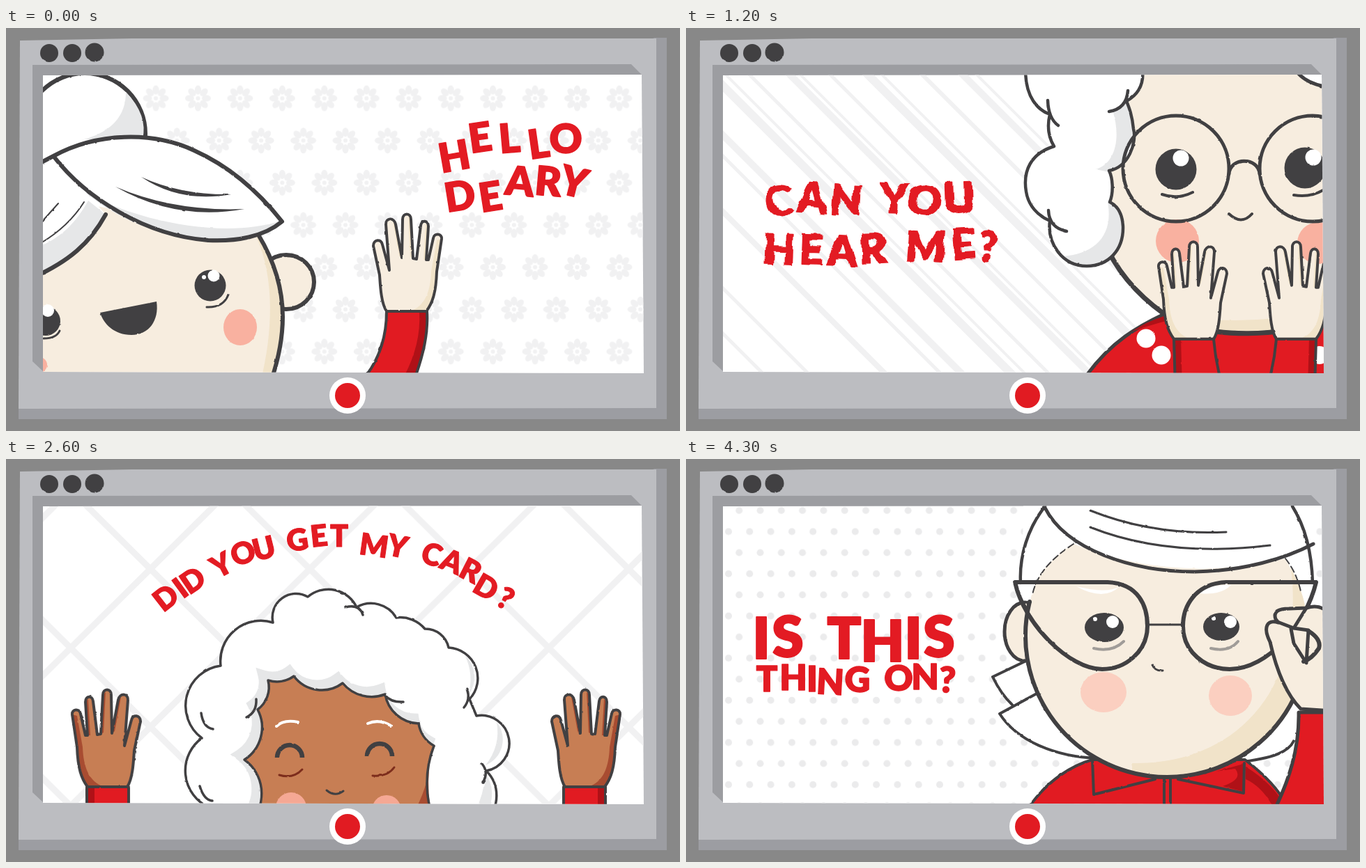
Recreate the animation shown at these times as an HTML page. Size 967 by 579 pixels, loop 4.4 s.

```html
<!DOCTYPE html>
<html lang="en">
<head>
<meta charset="utf-8">
<title>Video call</title>
<style>
  html, body { margin: 0; width: 100%; height: 100%; overflow: hidden; background: #888; }
  svg { display: block; width: 967px; height: 579px; --skin: #f7eddf; --shade: #f1e3c9; }
  .ink { stroke: #414042; stroke-linecap: round; stroke-linejoin: round; }
  .line { fill: none; }
  .dark { fill: #414042; }
  .white { fill: #fff; }
  .skin { fill: var(--skin); }
  .shade { fill: var(--shade); }
  .red { fill: #e11b22; }
  .deep { fill: #b01117; }
  .grey { fill: #e6e7e8; }
  .blush { fill: #f9b1a0; }
  .brown { --skin: #c77e54; --shade: #a84c31; }
  text { font-family: Lato, "Open Sans", sans-serif; font-weight: 900; text-anchor: middle;
         fill: #e31b23; stroke: #e31b23; stroke-linejoin: round; }
</style>
</head>
<body>
<svg viewBox="0 0 967 579">
  <defs>
    <clipPath id="screen"><path d="M53 68L912 67L915 496L53 494Z"/></clipPath>
    <filter id="ink" x="-5%" y="-5%" width="110%" height="110%" color-interpolation-filters="sRGB">
      <feTurbulence type="fractalNoise" baseFrequency=".12" numOctaves="2" seed="4"/>
      <feDisplacementMap in="SourceGraphic" scale="2" xChannelSelector="R" yChannelSelector="G"/>
    </filter>
    <filter id="rough" color-interpolation-filters="sRGB">
      <feTurbulence type="fractalNoise" baseFrequency=".06" numOctaves="1" seed="8"/>
      <feDisplacementMap in="SourceGraphic" scale="9" xChannelSelector="R" yChannelSelector="G"/>
    </filter>

    <g id="flower" fill="#f1f1f2"></g>
    <pattern id="flowers" x="184.8" y="70.7" width="60.45" height="121.3" patternUnits="userSpaceOnUse">
      <use href="#flower" x="30.2" y="30.3"/>
      <use href="#flower" y="91"/><use href="#flower" x="60.45" y="91"/>
    </pattern>
    <pattern id="lattice" x="207" y="158" width="228.7" height="227" patternUnits="userSpaceOnUse">
      <path d="M-20 -20L249 247M-20 247L249 -20" stroke="#f1f1f2" stroke-width="9"/>
    </pattern>
    <pattern id="dots" x="61" y="58.8" width="30.3" height="60.6" patternUnits="userSpaceOnUse">
      <g fill="#ebebec"><circle cx="15.2" cy="15.2" r="5"/><circle cy="45.4" r="5"/><circle cx="30.3" cy="45.4" r="5"/></g>
    </pattern>

    <!-- Open hand, origin at the tip of the middle finger -->
    <g id="hand">
      <path id="palm" class="skin" d="M-29 140C-37 128 -38 103 -39 88L-48 46C-48 37 -37 35 -35 44L-25 81L-30 15C-30 5 -18 5 -16 15L-7 63L-6 8C-6 -2 6 -2 6 8L9 64L14 65L20 17C21 8 31 9 31 18L28 66L31 66L38 35C39 27 51 28 50 36L43 83C42 113 37 128 28 140Z"/>
      <path class="shade" d="M50 36L43 83C42 113 37 128 28 140L4 140C27 133 34 110 35 83L43 38ZM31 18L28 66L24 66L27 14ZM6 8L9 64L5 62L2 4ZM-16 15L-7 63L-11 60L-20 11Z"/>
      <use href="#palm" class="ink line" fill-opacity="0" stroke-width="4"/>
    </g>
    <g id="cuffedHand">
      <rect class="red" x="-31" y="140" width="60" height="60"/>
      <rect class="deep" x="18" y="140" width="11" height="60"/>
      <path class="ink line" stroke-width="4" d="M-31 200V140H29V200"/>
      <use href="#hand"/>
    </g>
  </defs>

  <!-- Monitor -->
  <path fill="#9c9da2" d="M930 14H948V562H18V544Z"/>
  <path fill="#bcbdc1" d="M20 18L180 15L933 15V546L18 547Z"/>
  <path fill="#9c9da1" d="M38 53L897 52L912 67L54 70V494L38 479Z"/>
  <path class="white" d="M53 68L912 67L915 496L53 494Z"/>
  <g class="dark" filter="url(#ink)"><circle cx="62" cy="36" r="13"/><circle cx="95" cy="36" r="13"/><circle cx="127" cy="35" r="13.5"/></g>
  <circle class="white" cx="490" cy="528" r="26"/>
  <circle class="red" cx="490" cy="528" r="18"/>

  <g clip-path="url(#screen)">
    <!-- Waving -->
    <g class="scene">
      <rect x="53" y="67" width="862" height="429" fill="url(#flowers)"/>
      <g filter="url(#ink)">
        <ellipse class="skin ink" cx="402" cy="365" rx="40" ry="39" stroke-width="6"/>
        <path class="skin" d="M40 240L362 297C385 335 397 375 397 415C397 445 391 475 381 505H40Z"/>
        <path class="shade" d="M358 297C385 335 397 375 397 415C397 445 391 475 381 505H366C382 440 387 360 358 297Z"/>
        <path class="ink line" stroke-width="6" d="M362 297C385 335 397 375 397 415C397 445 391 475 381 505"/>
        <circle class="white ink" cx="113" cy="152" r="87" stroke-width="6"/>
        <path class="grey" d="M172 92Q204 125 196 160H112Q172 143 172 92Z"/>
        <path class="white" d="M40 197L68 181L143 268C120 310 90 335 40 355Z"/>
        <path class="grey" d="M118 248C100 280 80 300 50 313V350C90 334 120 308 143 268Z"/>
        <path class="ink line" stroke-width="6" d="M143 268C120 310 90 335 40 358"/>
        <path class="ink line" stroke-width="2" d="M75 252L50 280M112 250Q90 285 50 309"/>
        <path class="white" d="M68 184C130 150 210 148 270 176C330 203 370 245 396 278C370 300 330 307 290 305C200 298 115 245 68 184Z"/>
        <path class="grey" d="M112 235C180 275 310 305 394 277C370 300 330 307 290 305C220 300 160 275 112 235Z"/>
        <path class="ink line" stroke-width="6" d="M45 196L68 184C130 150 210 148 270 176C330 203 370 245 396 278C370 300 330 307 290 305C200 298 115 245 68 184"/>
        <path class="dark" d="M194 214Q250 240 323 239Q250 252 194 214ZM157 228Q240 264 342 260Q245 278 157 228Z"/>
        <g class="dark">
          <circle cx="293" cy="370" r="22.5"/><circle cx="57" cy="421" r="21"/>
          <path d="M135 409L216 393C220 420 205 441 180 441C155 441 140 425 135 409Z"/>
        </g>
        <g class="white"><circle cx="298" cy="356" r="8.5"/><circle cx="284" cy="358" r="3"/><circle cx="60" cy="406" r="9"/></g>
        <path class="ink line" stroke-width="3" d="M288 401Q312 402 319 383M54 446Q72 446 77 435"/>
        <ellipse class="blush" cx="336" cy="430" rx="24" ry="26"/>
        <circle class="blush" cx="48" cy="484" r="11"/>
        <g id="wave">
          <path class="red" d="M-29 140H29C31 173 23 203 13 232H-58C-40 208 -29 178 -29 140Z"/>
          <path class="deep" d="M18 140H29C31 173 23 203 13 232H-3C12 203 20 173 18 140Z"/>
          <path class="ink line" stroke-width="4" d="M-58 232C-40 208 -29 178 -29 140H29C31 173 23 203 13 232"/>
          <use href="#hand"/>
        </g>
      </g>
      <g class="words" data-size="58"></g>
    </g>

    <!-- Hands on cheeks -->
    <g class="scene">
      <g id="stripes" stroke="#f1f1f2"></g>
      <g filter="url(#ink)">
        <path class="skin" d="M600 60H920V420C860 450 760 450 700 420C660 395 625 360 605 318Z"/>
        <path class="shade" d="M690 410Q795 432 920 405V425C860 448 760 448 700 420Z"/>
        <path class="red ink" stroke-width="5" d="M574 500C610 450 650 428 686 411Q795 468 925 411V505Z"/>
        <path class="ink line" stroke-width="7" d="M605 318C625 360 660 395 700 420C760 446 850 444 920 420"/>
        <path class="deep" d="M640 436Q660 422 686 414L692 420Q662 428 640 436Z"/>
        <g class="white"><circle cx="660" cy="446" r="13.5"/><circle cx="682" cy="470" r="13.5"/><circle cx="909" cy="470" r="13"/></g>
        <g class="blush"><circle cx="705" cy="306" r="31"/><circle cx="907" cy="309" r="30"/></g>
        <path id="curls" class="white" d="M487 60C487 100 505 118 522 124C517 145 522 160 528 170C495 180 483 205 488 235C491 255 505 270 522 277C518 310 540 342 575 342C605 342 628 320 627 285C626 265 618 255 608 250C614 235 612 215 607 205C635 200 647 165 642 145C640 125 636 115 632 105C650 95 657 80 655 60Z"/>
        <path class="grey" d="M612 118C625 160 615 195 588 203L607 207C645 190 645 140 632 108ZM605 250C614 300 585 325 540 328C565 348 625 345 627 290C626 265 618 255 605 250Z"/>
        <use href="#curls" class="ink line" fill-opacity="0" stroke-width="4.5"/>
        <path class="ink line" stroke-width="4.5" d="M519 104Q520 130 534 140M520 262Q521 287 546 292M634 90Q632 116 607 120"/>
        <path class="white ink" stroke-width="5" d="M874 60Q890 82 925 85V60Z"/>
        <g class="ink line" stroke-width="5">
          <circle cx="703" cy="202" r="76"/><circle cx="899" cy="202" r="76"/>
          <path d="M779 210C780 185 822 185 823 210"/>
        </g>
        <g class="dark"><circle cx="703" cy="203" r="29.5"/><circle cx="888" cy="201" r="29.5"/></g>
        <g class="white"><circle cx="710" cy="187" r="11.5"/><circle cx="900" cy="186" r="11.5"/></g>
        <path class="ink line" stroke-width="4" d="M683 239Q705 247 727 236M872 240Q895 244 914 233M779 267Q797 284 812 267"/>
        <g id="cheekHands">
          <g id="sleeved" transform="translate(876 302)">
            <path class="red" d="M-29 140H28L26 210H-42Z"/>
            <path class="deep" d="M18 140H28L26 210H16Z"/>
            <path class="ink line" stroke-width="4" d="M-42 210Q-32 175 -29 140H28L26 210"/>
            <use href="#hand"/>
          </g>
          <use href="#sleeved" transform="matrix(-1 0 0 1 1604 0)"/>
        </g>
      </g>
      <g class="words" data-size="60"></g>
    </g>

    <!-- Peeking up -->
    <g class="scene">
      <rect x="53" y="67" width="862" height="429" fill="url(#lattice)"/>
      <g class="words" data-size="43"></g>
      <g class="brown" filter="url(#ink)">
        <g id="peek">
          <path class="white ink" stroke-width="3.5" d="M290 500A58 58 0 0 1 281 401A58 58 0 0 1 308 297A58 58 0 0 1 383 235A34 34 0 0 1 433 198A45 45 0 0 1 503 213A42 42 0 0 1 560 228A46 46 0 0 1 601 244A34 34 0 0 1 635 271A44 44 0 0 1 665 345L675 369A40 40 0 0 1 689 448A50 50 0 0 1 688 520H290Z"/>
          <path class="grey" d="M658 281A44 44 0 0 1 663 340Q672 310 658 281ZM704 378A40 40 0 0 1 688 440Q710 412 704 378ZM688 452A50 50 0 0 1 688 510H672Q686 480 688 452Z"/>
          <use href="#face" x="-7" y="-7" style="--skin:#e6e7e8" stroke="#e6e7e8" stroke-width="15"/>
          <path id="face" class="skin" d="M352 520A60 60 0 0 0 342 432A55 55 0 0 0 361 360A40 40 0 0 0 376 318A42 42 0 0 0 413 312A50 50 0 0 0 483 322A54 54 0 0 0 544 338A50 50 0 0 0 592 380A44 44 0 0 0 614 412A150 150 0 0 0 614 520Z"/>
          <path class="shade" d="M607 445Q604 480 611 520H578Q602 482 607 445Z"/>
          <use href="#face" class="ink line" fill-opacity="0" stroke-width="3.5"/>
          <path class="ink line" stroke-width="3.5" d="M487 213Q507 208 512 224M280 365Q283 386 297 388M359 345Q360 364 345 371M661 330Q667 345 657 357M683 438Q693 450 684 465M544 340Q553 350 570 349M278 470Q284 490 296 491"/>
          <path class="line" stroke="#fff" stroke-width="4" stroke-linecap="round" d="M388 384Q398 374 419 378M519 380Q535 373 552 383"/>
          <path class="ink line" style="stroke-linecap:butt" stroke-width="6.5" d="M389 429A18 18 0 0 1 425 429M518 427A18 18 0 0 1 554 427"/>
          <path class="line" stroke="#7d2d1c" stroke-width="3" stroke-linecap="round" d="M392 454Q412 460 425 446M526 455Q547 457 557 443"/>
          <path class="ink line" stroke-width="3" d="M460 476Q472 486 484 477"/>
          <g fill="#f5a894"><circle cx="409" cy="501" r="22"/><circle cx="546" cy="504" r="21"/></g>
        </g>
        <use id="leftHand" href="#cuffedHand"/>
        <use id="rightHand" href="#cuffedHand"/>
      </g>
    </g>

    <!-- Adjusting glasses -->
    <g class="scene">
      <rect x="53" y="67" width="862" height="429" fill="url(#dots)"/>
      <g filter="url(#ink)">
        <path class="white" d="M513 60C490 100 478 140 480 190L492 288L440 313L465 352L450 366C475 405 530 428 590 432H800C850 432 868 420 876 400L900 180C898 140 890 100 868 60Z"/>
        <path class="ink line" stroke-width="4" d="M490 289L440 313Q452 338 468 353M505 336L450 366C475 405 530 428 590 430M790 436C845 430 865 420 872 405"/>
        <path class="red ink" stroke-width="4" d="M492 500C520 460 555 440 583 432H802C832 455 850 475 864 500Z"/>
        <path class="deep" d="M760 449L800 438V478L770 470Q800 460 788 445ZM803 442Q840 465 858 496H840Q825 470 803 460Z"/>
        <path class="ink line" stroke-width="4" d="M583 432L585 482L673 460M801 437L800 480L706 460M686 458V500M695 458V500"/>
        <ellipse class="skin ink" cx="486" cy="248" rx="29" ry="42" stroke-width="5"/>
        <circle class="skin" cx="690" cy="255" r="203"/>
        <path class="shade" d="M868 157A203 203 0 0 1 640 451L640 437C780 440 890 340 868 157Z"/>
        <path class="ink line" stroke-width="6" d="M493 205A203 203 0 1 0 893 255"/>
        <path class="white" d="M484 60H900L900 178L882 190Q878 165 860 143Q700 180 556 122Q505 155 497 195H482Z"/>
        <path class="ink line" stroke-width="2" stroke-dasharray="9 5" d="M556 122Q505 155 497 195M860 143Q876 163 882 190"/>
        <path class="ink line" stroke-width="4.5" d="M515 68C490 100 478 140 480 178M870 68C890 100 898 140 899 178"/>
        <path class="ink line" stroke-width="5" d="M515 70C545 130 640 162 730 162C800 161 860 143 900 122"/>
        <path class="ink line" stroke-width="3" d="M580 74Q670 110 775 105M580 98Q690 142 838 124"/>
        <g class="dark"><ellipse cx="600" cy="242" rx="28" ry="21"/><ellipse cx="768" cy="241" rx="26" ry="20"/></g>
        <g class="white"><circle cx="612" cy="234" r="9"/><circle cx="781" cy="234" r="9"/><circle cx="587" cy="230" r="3"/><circle cx="757" cy="229" r="3"/></g>
        <path class="line" stroke="#a09c98" stroke-width="4" stroke-linecap="round" d="M585 272Q612 278 628 262M753 272Q779 278 792 262"/>
        <path class="ink line" stroke-width="3" d="M669 296Q673 305 684 304"/>
        <g fill="#fbcfc0"><ellipse cx="599" cy="335" rx="33" ry="29"/><ellipse cx="781" cy="340" rx="31" ry="29"/></g>
        <g id="adjust">
          <path class="white" d="M560 186Q600 208 622 186Q605 197 560 186ZM737 196Q750 183 782 184Q768 199 737 196Z"/>
          <path class="ink line" stroke-width="6" d="M472 180H605C650 182 662 215 662 243C662 280 630 305 597 305C550 305 485 240 472 180ZM904 180H775C730 182 713 215 713 243C713 280 745 305 780 305C835 305 890 240 904 180Z"/>
          <path class="ink line" stroke-width="3" d="M662 241H713"/>
          <path class="skin ink" stroke-width="5" d="M925 365L882 362C862 342 848 310 838 266C827 244 834 233 850 238L846 233C842 222 850 218 865 218L890 217Q912 210 925 228Z"/>
          <path class="ink line" stroke-width="5" d="M846 236L872 246L893 249L890 296L872 268L868 247M872 246L890 217"/>
          <path class="ink line" stroke-width="6" d="M893 250Q912 262 908 275Q898 290 886 294"/>
          <path class="red ink" stroke-width="5" d="M879 367H925V510H843C865 465 880 420 879 367Z"/>
        </g>
      </g>
      <g class="words" data-size="81"></g>
      <g class="words" data-size="51"></g>
    </g>
  </g>
</svg>
<script>
const $ = id => document.getElementById(id);
const scenes = [...document.querySelectorAll('.scene')];
const words = [...document.querySelectorAll('.words')];

// Each letter: centre x, centre y, tilt
const lettering = [
  ['HELLODEARY', [643,184,-10], [680,157,-8], [722,158,-5], [764,166,-8], [803,159,0],
    [651,241,-9], [695,242,-9], [737,220,5], [778,220,5], [815,221,14]],
  ['CANYOUHEARME?', [133,248,-4], [181,244,4], [230,247,3], [298,244,2], [343,247,0], [392,244,-2],
    [134,318,2], [180,318,2], [224,320,3], [269,317,-2], [344,314,4], [398,310,-4], [433,314,3]],
  ['DIDYOUGETMYCARD?', [229,199,-38], [250,185,-36], [268,174,-34], [309,152,-28], [340,135,-20], [370,128,-14],
    [418,116,-9], [449,110,-6], [478,111,0], [528,124,8], [562,125,12], [611,137,18], [640,147,22],
    [667,160,27], [689,184,30], [717,200,28]],
  ['ISTHIS', [108,258,0], [146,255,-2], [227,258,0], [282,262,0], [326,258,0], [363,255,-2]],
  ['THINGON?', [116,316,0], [154,314,0], [181,316,0], [207,320,3], [246,317,0], [305,315,0], [343,313,0], [375,317,3]]
];
words.forEach((group, n) => {
  const [string, ...places] = lettering[n], size = group.dataset.size;
  group.innerHTML = places.map(([x, y, tilt], i) =>
    `<text transform="translate(${x} ${y}) rotate(${tilt})" y="${size * .36}" font-size="${size}"
      stroke-width="${size * .025}">${string[i]}</text>`).join('');
});

$('flower').innerHTML = [...Array(8).keys()].map(k =>
  `<ellipse cy="-12" rx="4.6" ry="6.5" transform="rotate(${k * 45})"/>`).join('') +
  '<circle r="4" stroke="#fff" stroke-width="2"/>';

// Diagonal stripes: x at the top edge, width
$('stripes').innerHTML = [[-318,5], [-253,5], [-143,8], [-63,5], [-33,10], [38,12], [58,4], [92,5], [150,10],
  [165,4], [208,5], [262,12], [282,4], [340,6], [398,10], [418,4]].map(([x, w]) =>
  `<path d="M${x - 30} 38L${x + 470} 538" stroke-width="${w}"/>`).join('');

const move = (id, x, y, mirror = 1) =>
  $(id).setAttribute('transform', `translate(${x} ${y}) scale(${mirror} 1)`);

function draw(now) {
  const tick = Math.floor(now % 4400 / 100);
  const current = Math.floor(tick / 11), step = tick % 11;
  scenes.forEach((scene, i) => scene.style.display = i === current ? '' : 'none');

  const rise = (step - 4) / 6;
  move('wave', 575 - step * 6 / 7, 267);
  move('cheekHands', 0, (7 - step) * .8);
  move('peek', 0, -8 * rise);
  move('leftHand', 145 + 3.5 * rise, 331 - 8 * rise, -1);
  move('rightHand', 831 - 8 * rise, 331 - 8 * rise);
  move('adjust', 0, -3 * rise);

  // Lettering alternates between smooth and rough, except on the arch
  words.forEach((group, i) => {
    if (step % 2 && i !== 2) group.setAttribute('filter', 'url(#rough)');
    else group.removeAttribute('filter');
  });
}

const start = performance.now();
function frame() {
  draw(performance.now() - start);
  requestAnimationFrame(frame);
}
frame();
</script>
</body>
</html>
```
